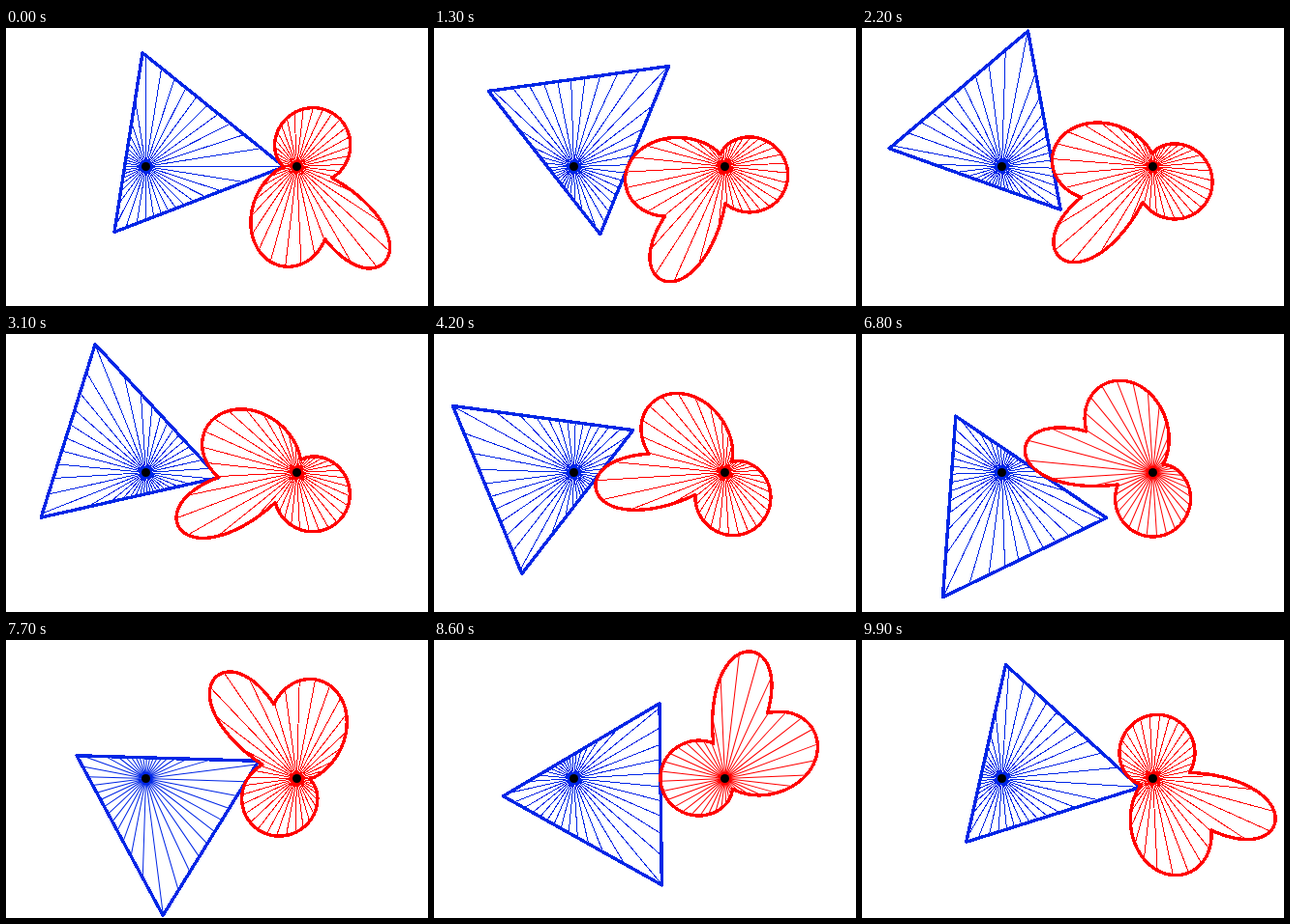
Recreate the animation shown at these times as an HTML page. Size 436 by 288 pixels, loop 10000 ms.

```html
<!DOCTYPE html>
<html lang="en">
<head>
<meta charset="utf-8">
<title>Rolling triangle and its conjugate</title>
<style>
  html, body { margin: 0; width: 100%; height: 100%; overflow: hidden; background: #fff; }
  svg { display: block; width: 436px; height: 288px; }
  path { fill: none; stroke-linejoin: round; shape-rendering: crispEdges; }
  .outline { stroke-width: 3.4; }
  .spokes { stroke-width: 1; }
  #triangle { stroke: #0026e6; }
  #mate { stroke: #f00; }
</style>
</head>
<body>
<svg viewBox="0 0 436 288">
  <g id="triangle"><path class="spokes"/><path class="outline"/></g>
  <g id="mate"><path class="spokes"/><path class="outline"/></g>
  <circle cx="144.5" cy="143.5" r="4.5"/>
  <circle cx="300.5" cy="143.5" r="4.5"/>
</svg>
<script>
const LOOP = 10000, STEPS = 100, SAMPLES = 1800, SPOKES = 40;
const TURN = 2 * Math.PI, RAD = Math.PI / 180;
const LEFT = 144.5, RIGHT = 300.5, AXIS = 143.5, GAP = RIGHT - LEFT;
const MATE_SPOKE_SHIFT = 2.5 * RAD;

// Equilateral triangle turning about a point away from its centre.
const INRADIUS = 54.3, OFFSET = 39.3, OFFSET_DIR = 24.9 * RAD;
const edges = [51.1, 171.1, 291.1].map(deg => {
  const dir = deg * RAD;
  return { dir, dist: INRADIUS + OFFSET * Math.cos(dir - OFFSET_DIR) };
});

function triangleRadius(angle) {
  return Math.min(...edges.map(({ dir, dist }) => {
    const c = Math.cos(angle - dir);
    return c > 0 ? dist / c : Infinity;
  }));
}

// Turn of the mating curve for each sample of the triangle's turn.
function rollAngles(scale) {
  const roll = [0];
  for (let i = 0; i < SAMPLES; i++) {
    const r = scale * triangleRadius(-(i + 0.5) * TURN / SAMPLES);
    roll.push(roll[i] + r / (GAP - r) * TURN / SAMPLES);
  }
  return roll;
}

// Pick the size at which the mating curve closes after one turn.
let low = 0.95, high = 1.05;
for (let i = 0; i < 30; i++) {
  const mid = (low + high) / 2;
  if (rollAngles(mid)[SAMPLES] < TURN) low = mid; else high = mid;
}
const scale = (low + high) / 2;
const roll = rollAngles(scale);
const radius = angle => scale * triangleRadius(angle);
const mateRadii = roll.map((_, i) => GAP - radius(-i * TURN / SAMPLES));

function mateRadius(angle) {
  const i = Math.max(1, roll.findIndex(a => a >= angle));
  const k = (angle - roll[i - 1]) / (roll[i] - roll[i - 1]);
  return mateRadii[i - 1] + k * (mateRadii[i] - mateRadii[i - 1]);
}

const point = (cx, r, angle) =>
  (cx + r * Math.cos(angle)).toFixed(2) + ' ' + (AXIS - r * Math.sin(angle)).toFixed(2);

function drawBody(id, cx, outline, spokeRadius, start, shift) {
  const body = document.getElementById(id);
  const spokes = Array.from({ length: SPOKES }, (_, i) => {
    const angle = shift + i * TURN / SPOKES;
    return `M${cx} ${AXIS}L${point(cx, spokeRadius(angle), start + angle)}`;
  });
  body.querySelector('.spokes').setAttribute('d', spokes.join(''));
  body.querySelector('.outline').setAttribute('d', 'M' + outline.join('L') + 'Z');
  return body;
}

const corners = edges.map((a, i) => {
  const b = edges[(i + 1) % 3];
  const det = Math.sin(b.dir - a.dir);
  const x = (a.dist * Math.sin(b.dir) - b.dist * Math.sin(a.dir)) / det;
  const y = (b.dist * Math.cos(a.dir) - a.dist * Math.cos(b.dir)) / det;
  return point(LEFT, scale * Math.hypot(x, y), Math.atan2(y, x));
});
const mateOutline = mateRadii.slice(0, -1).map((r, i) => point(RIGHT, r, Math.PI + roll[i]));

const triangle = drawBody('triangle', LEFT, corners, radius, 0, 0);
const mate = drawBody('mate', RIGHT, mateOutline, mateRadius, Math.PI, MATE_SPOKE_SHIFT);

const turn = (body, cx, angle) =>
  body.setAttribute('transform', `rotate(${angle / RAD} ${cx} ${AXIS})`);

function render(ms) {
  const step = Math.floor(ms % LOOP / LOOP * STEPS);
  turn(triangle, LEFT, -step / STEPS * TURN);
  turn(mate, RIGHT, roll[step * SAMPLES / STEPS]);
}

const begin = performance.now();
function tick() {
  render(performance.now() - begin);
  requestAnimationFrame(tick);
}
tick();
</script>
</body>
</html>
```
